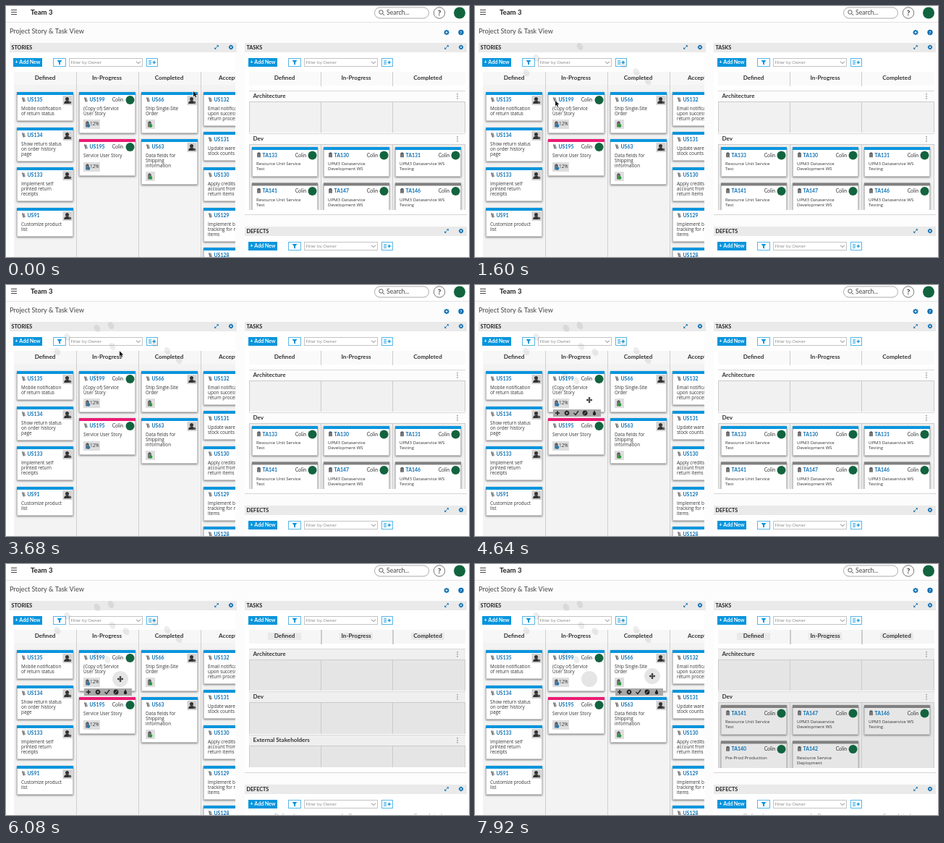
An HTML page with a canvas that plays this animation: 640 by 347 pixels, repeating every 8 s.

```html
<!DOCTYPE html>
<html lang="en">
<head>
<meta charset="utf-8">
<title>Project Story &amp; Task View</title>
<style>
html, body { margin: 0; width: 100%; height: 100%; overflow: hidden; background: #fff; }
canvas { display: block; width: 640px; height: 347px; }
</style>
</head>
<body>
<canvas id="stage"></canvas>
<script>
const W = 640, H = 347, LOOP = 8000;
const BLUE = '#0795dd', LINK = '#0b6fb3', PINK = '#ec1b74', GRAY = '#808080', INK = '#333';
const HEAD = 'Lato, sans-serif', BODY = '"Open Sans", "Noto Sans", sans-serif';
const OWNER = 'Colin';
const canvas = document.getElementById('stage');
const ctx = canvas.getContext('2d');
const ratio = window.devicePixelRatio || 1;
canvas.width = W * ratio;
canvas.height = H * ratio;

function rect(x, y, w, h, color) {
  ctx.fillStyle = color;
  ctx.fillRect(x, y, w, h);
}

function frame(x, y, w, h, color) {
  ctx.strokeStyle = color;
  ctx.lineWidth = 1;
  ctx.strokeRect(x + 0.5, y + 0.5, w - 1, h - 1);
}

function line(points, color, width = 1) {
  ctx.beginPath();
  points.forEach(([x, y]) => ctx.lineTo(x, y));
  ctx.strokeStyle = color;
  ctx.lineWidth = width;
  ctx.stroke();
}

function shape(points, color) {
  ctx.beginPath();
  points.forEach(([x, y]) => ctx.lineTo(x, y));
  ctx.closePath();
  ctx.fillStyle = color;
  ctx.fill();
}

function disc(x, y, r, color) {
  ctx.beginPath();
  ctx.arc(x, y, r, 0, Math.PI * 2);
  ctx.fillStyle = color;
  ctx.fill();
}

function ring(x, y, r, color, width = 1) {
  ctx.beginPath();
  ctx.arc(x, y, r, 0, Math.PI * 2);
  ctx.strokeStyle = color;
  ctx.lineWidth = width;
  ctx.stroke();
}

function text(str, x, y, font, color = INK, align = 'left') {
  ctx.font = font;
  ctx.fillStyle = color;
  ctx.textAlign = align;
  ctx.textBaseline = 'middle';
  ctx.fillText(str, x, y);
}

function clipped(x, y, w, h, draw) {
  ctx.save();
  ctx.beginPath();
  ctx.rect(x, y, w, h);
  ctx.clip();
  draw();
  ctx.restore();
}

const bold = size => `bold ${size}px ${HEAD}`;
const plain = size => `${size}px ${BODY}`;

function gear(x, y, r, color, hole) {
  for (let i = 0; i < 8; i++) {
    const a = i * Math.PI / 4;
    line([[x, y], [x + Math.cos(a) * r, y + Math.sin(a) * r]], color, r * 0.45);
  }
  disc(x, y, r * 0.78, color);
  disc(x, y, r * 0.36, hole);
}

function expandIcon(x, y) {
  line([[x - 2, y + 2], [x + 2, y - 2]], LINK, 0.8);
  shape([[x, y - 2.7], [x + 2.8, y - 2.7], [x + 2.8, y]], LINK);
  shape([[x, y + 2.7], [x - 2.8, y + 2.7], [x - 2.8, y]], LINK);
}

function funnel(x, y) {
  shape([[x - 3.5, y - 3], [x + 3.5, y - 3], [x + 1, y], [x + 1, y + 3.6], [x - 1, y + 2.5], [x - 1, y]], BLUE);
}

function person(x, y) {
  rect(x, y, 13, 13, '#d2d2d2');
  disc(x + 6, y + 4.5, 2.5, INK);
  shape([[x + 1.5, y + 11], [x + 2.5, y + 8], [x + 5, y + 7], [x + 8, y + 7], [x + 10.5, y + 9], [x + 10.5, y + 11]], INK);
  disc(x + 10, y + 9.5, 1.8, '#555');
}

function avatar(x, y, r) {
  disc(x, y, r, '#12643f');
}

function pageHeader() {
  rect(0, 0, W, 22, '#fff');
  rect(0, 22, W, 1, '#e3e3e3');
  [5, 8, 11].forEach(y => rect(7, y, 8, 1, '#444'));
  text('Team 3', 34, 9.5, bold(9.6), '#222');
  ctx.beginPath();
  ctx.roundRect(509.5, 2, 75, 15, 7.5);
  ctx.strokeStyle = '#aaa';
  ctx.lineWidth = 1;
  ctx.stroke();
  ring(518.5, 8.5, 2.7, '#555');
  line([[520.5, 10.5], [523, 13]], '#555');
  text('Search...', 526, 9.7, `8.6px ${HEAD}`, '#444');
  ring(599, 9.5, 7.7, '#777');
  text('?', 599, 10, bold(10), '#333', 'center');
  avatar(627, 9.5, 8);
  text('Project Story & Task View', 5, 35.5, `9.1px ${HEAD}`, '#444');
  gear(609, 36.5, 3.6, LINK, '#fff');
  disc(629, 36.5, 3.7, LINK);
  text('?', 629, 36.8, bold(6), '#fff', 'center');
}

function panelTop(x, y, width, title) {
  rect(x, y, width, 13, '#eaeaea');
  text(title, x + 2.5, y + 6.5, bold(7.2), '#222');
  const right = x + width;
  expandIcon(right - 28, y + 6);
  gear(right - 8, y + 6, 3.2, LINK, '#eaeaea');
}

function toolRow(x, y, busy) {
  rect(x, y, 40, 12, busy ? '#b3b3b3' : BLUE);
  text('+ Add New', x + 20, y + 6.2, bold(7), '#fff', 'center');
  rect(x + 55, y, 18, 12, '#fff');
  frame(x + 55, y, 18, 12, '#58b7e8');
  funnel(x + 64, y + 6);
  rect(x + 77, y, 102, 12, '#fff');
  frame(x + 77, y, 102, 12, '#c4c4c4');
  text('Filter by Owner', x + 79.5, y + 6.2, plain(6), '#888');
  line([[x + 170, y + 4.8], [x + 173, y + 7.5], [x + 176, y + 4.8]], '#777', 0.9);
  rect(x + 184, y, 16, 12, '#fff');
  frame(x + 184, y, 16, 12, '#58b7e8');
  [3.8, 6, 8.2].forEach(dy => line([[x + 187, y + dy], [x + 191, y + dy]], BLUE, 0.9));
  line([[x + 192.5, y + 6], [x + 197, y + 6]], BLUE, 1.2);
  line([[x + 194.7, y + 3.8], [x + 194.7, y + 8.2]], BLUE, 1.2);
}

function cardBox(x, y, w, h, bar, fill = '#fff') {
  ctx.save();
  ctx.shadowColor = 'rgba(0,0,0,.5)';
  ctx.shadowBlur = 2.5 * ratio;
  ctx.shadowOffsetY = ratio;
  rect(x, y, w, h, fill);
  ctx.restore();
  frame(x, y, w, h, '#c8c8c8');
  rect(x, y, w, 4, bar);
}

function storyIcon(x, y) {
  shape([[x, y - 3], [x + 3.5, y - 3], [x + 5, y + 2.5], [x + 2, y + 3]], '#999');
  line([[x + 0.5, y - 3], [x + 2.2, y + 3]], '#555', 0.8);
}

function taskIcon(x, y) {
  rect(x, y - 2.8, 5, 6, '#777');
  rect(x + 1.3, y - 3.5, 2.4, 1.5, '#444');
}

function badge(x, y, label) {
  const w = label ? 23 : 13;
  rect(x, y, w, 13, '#dedede');
  rect(x + 3, y + 3.5, 5, 7, label ? '#707880' : '#777');
  rect(x + 4.3, y + 2.5, 2.4, 2, '#444');
  disc(x + 7, y + 8.5, 2.3, label ? '#2879ad' : '#269a34');
  if (label) text(label, x + 9, y + 6.8, plain(6.4));
}

function storyCard({ x, y, h, id, lines, owned, bar = BLUE, tag }) {
  cardBox(x, y, 78, h, bar);
  storyIcon(x + 7, y + 10.5);
  text(id, x + 14.5, y + 11, bold(6.9), LINK);
  lines.forEach((s, i) => text(s, x + 6, y + 23.3 + i * 6.8, plain(6.35)));
  if (owned) {
    text(OWNER, x + 61, y + 11, `6.8px ${HEAD}`, INK, 'right');
    avatar(x + 70.5, y + 11, 6);
  } else {
    person(x + 63.5, y + 5);
  }
  if (tag !== undefined) badge(x + 6, y + 38 - (lines.length === 1 ? 6 : 0) + (lines.length === 3 ? 7 : 0), tag);
}

const stories = [
  { x: 15, y: 119, h: 40, id: 'US135', lines: ['Mobile notification', 'of return status'] },
  { x: 15, y: 168, h: 47, id: 'US134', lines: ['Show return status', 'on order history', 'page'] },
  { x: 15, y: 223, h: 47, id: 'US133', lines: ['Implement self', 'printed return', 'receipts'] },
  { x: 15, y: 279, h: 40, id: 'US91', lines: ['Customize product', 'list'] },
  { x: 101, y: 119, h: 57, id: 'US199', lines: ['(Copy of) Service', 'User Story'], owned: true, tag: '12%' },
  { x: 101, y: 184, h: 51, id: 'US195', lines: ['Service User Story'], owned: true, bar: PINK, tag: '12%' },
  { x: 187, y: 119, h: 57, id: 'US66', lines: ['Ship Single-Site', 'Order'], tag: '' },
  { x: 187, y: 184, h: 63, id: 'US63', lines: ['Data fields for', 'Shipping', 'information'], tag: '' },
  { x: 273, y: 119, h: 47, id: 'US132', lines: ['Email notification', 'upon successful', 'return processing'] },
  { x: 273, y: 174, h: 40, id: 'US131', lines: ['Update warehouse', 'stock counts'] },
  { x: 273, y: 223, h: 47, id: 'US130', lines: ['Apply credits to', 'account from valid', 'return items'] },
  { x: 273, y: 279, h: 47, id: 'US129', lines: ['Implement barcode', 'tracking for return', 'items'] },
  { x: 273, y: 334, h: 40, id: 'US128', lines: [] }
];

function storiesPanel() {
  panelTop(5, 51, 314, 'STORIES');
  rect(5, 64, 312, 283, '#fff');
  toolRow(10, 72, false);
  clipped(5, 90, 312, 257, () => {
    rect(11, 91, 306, 18, '#f7f7f7');
    rect(11, 109, 306, 238, '#f3f3f3');
    [97, 183, 269].forEach(x => rect(x, 91, 1, 256, '#cfcfcf'));
    const names = ['Defined', 'In-Progress', 'Completed', 'Accepted'];
    names.forEach((s, i) => text(s, [54, 139.5, 225.5, 311][i], 100, bold(8.1), INK, 'center'));
    stories.forEach(storyCard);
  });
}

const UNIT = ['Resource Unit Service', 'Test'];
const DEVELOP = ['UPM3 Dataservice', 'Development WS'];
const TESTING = ['UPM3 Dataservice WS', 'Testing'];
const allTasks = [
  ['TA133', UNIT, BLUE], ['TA130', DEVELOP, BLUE], ['TA131', TESTING, BLUE],
  ['TA141', UNIT, GRAY], ['TA147', DEVELOP, GRAY], ['TA146', TESTING, GRAY]
];
const storyTasks = [
  ...allTasks.slice(3),
  ['TA140', ['Pre-Prod Production'], GRAY], ['TA142', ['Resource Service', 'Deployment'], GRAY]
];

function taskCards(tasks, fill) {
  clipped(336, 191, 299, 91, () => tasks.forEach(([id, lines, bar], i) => {
    const x = 340 + (i % 3) * 99, y = 195 + Math.floor(i / 3) * 49.5;
    cardBox(x, y, 91, 41, bar, fill);
    taskIcon(x + 7, y + 11);
    text(id, x + 14.5, y + 11.5, bold(6.9), LINK);
    text(OWNER, x + 75, y + 11.5, `6.8px ${HEAD}`, INK, 'right');
    avatar(x + 83.5, y + 11.5, 6);
    lines.forEach((s, k) => text(s, x + 6, y + 23.8 + k * 6.8, plain(6.1)));
  }));
}

function columnNames(y, color, patch) {
  ['Defined', 'In-Progress', 'Completed'].forEach((s, i) => {
    const x = 385 + i * 99;
    if (patch) rect(x - 23, y - 5, 46, 10, patch);
    text(s, x, y, bold(8.1), color, 'center');
  });
}

function lane(name, y, bottom, bg, fill) {
  rect(336, y, 299, 15, bg);
  rect(336, y, 299, 1, '#d8d8d8');
  text(name, 341.5, y + 7.5, bold(8.1), INK);
  [4, 7, 10].forEach(dy => rect(623, y + dy, 2, 1.5, '#aaa'));
  rect(336, y + 15, 299, bottom - y - 15, fill);
  [336, 435, 534, 634].forEach(x => rect(x, y + 15, 1, bottom - y - 15, '#cbcbcb'));
  rect(336, y + 15, 299, 1, '#cbcbcb');
}

function loadingTasks() {
  columnNames(100, '#dedede', '#f1f1f1');
  [435, 534].forEach(x => rect(x, 91, 3, 20, '#ececec'));
  rect(336, 117, 299, 14, '#f0f0f0');
  rect(336, 131, 299, 156, '#e9e9e9');
  rect(336, 177, 299, 13, '#efefef');
  text('Architecture', 341.5, 124.5, bold(8.1), '#d8d8d8');
  text('Dev', 341.5, 184.5, bold(8.1), '#d4d4d4');
  clipped(336, 191, 299, 91, () => allTasks.forEach(([id, lines], i) => {
    const x = 340 + (i % 3) * 99, y = 195 + Math.floor(i / 3) * 49.5;
    frame(x, y, 91, 41, '#f6f6f6');
    text(id, x + 14.5, y + 11.5, bold(6.9), '#d4d4d4');
    text(OWNER, x + 75, y + 11.5, `6.8px ${HEAD}`, '#d4d4d4', 'right');
    disc(x + 83.5, y + 11.5, 6, '#dedede');
    lines.forEach((s, k) => text(s, x + 6, y + 23.8 + k * 6.8, plain(6.1), '#d0d0d0'));
  }));
  rect(623, 121, 2, 7, '#d0d0d0');
  rect(623, 181, 2, 7, '#d0d0d0');
}

function tasksPanel(state) {
  const busy = state === 'loading';
  panelTop(330, 51, 307, 'TASKS');
  rect(330, 64, 307, 225, '#fff');
  rect(330, 288, 307, 1, '#d6d6d6');
  toolRow(335, 72, busy);
  if (busy) {
    loadingTasks();
  } else {
    const fresh = state === 'all';
    const laneBg = fresh ? '#fcfcfc' : '#efefef';
    const cell = fresh ? '#f1f1f1' : '#e5e5e5';
    rect(336, 91, 299, 19, fresh ? '#fafafa' : '#f6f6f6');
    columnNames(100, INK, fresh ? '' : '#e9e9e9');
    [435, 534].forEach(x => rect(x, 91, fresh ? 1 : 2, 20, '#cbcbcb'));
    lane('Architecture', 117, 175, laneBg, cell);
    if (state === 'empty') {
      lane('Dev', 176, 235, laneBg, cell);
      lane('External Stakeholders', 236, 281, laneBg, cell);
    } else {
      lane('Dev', 176, 282, laneBg, cell);
      taskCards(fresh ? allTasks : storyTasks, fresh ? '#fff' : '#e6e6e6');
    }
  }
  panelTop(330, 305, 307, 'DEFECTS');
  rect(330, 318, 307, 29, '#fff');
  toolRow(335, 326, busy);
  if (!fresh0(state)) columnNames(349, '#c8c8c8', '');
}

const fresh0 = state => state === 'all';

function actionBar(x) {
  const y = 177, dark = '#222';
  rect(x, 172, 66, 10, '#a8a8a8');
  line([[x + 3, y], [x + 9, y]], dark, 1.5);
  line([[x + 6, y - 3], [x + 6, y + 3]], dark, 1.5);
  gear(x + 19, y, 3.5, dark, '#a8a8a8');
  line([[x + 28.5, y], [x + 31, y + 2.5], [x + 35, y - 3]], dark, 1.3);
  disc(x + 44, y, 3.4, dark);
  line([[x + 42, y + 2], [x + 46, y - 2]], '#a8a8a8', 0.9);
  disc(x + 57, y + 1, 2.2, dark);
  shape([[x + 57, y - 4], [x + 59, y + 0.5], [x + 55, y + 0.5]], dark);
}

// Pointer path: time, x, y.
const path = [
  [0, 259, 118], [80, 259, 118], [400, 224, 88], [800, 143, 53], [1050, 84, 69], [1260, 72, 88],
  [1560, 111, 131], [1840, 111, 131], [2400, 141, 129], [2720, 141, 129], [3040, 126, 110],
  [3360, 146, 84], [3920, 164, 96], [4320, 158, 159], [6480, 158, 159], [6640, 162, 159],
  [7280, 255, 157], [7440, 255, 157], [7680, 245, 155], [LOOP, 245, 155]
];

function pointerAt(t) {
  const i = path.findIndex((p, k) => k && t <= p[0]);
  const [t0, x0, y0] = path[i - 1], [t1, x1, y1] = path[i];
  const f = (t - t0) / (t1 - t0), s = f * f * (3 - 2 * f);
  return [x0 + (x1 - x0) * s, y0 + (y1 - y0) * s];
}

function arrow(x, y) {
  const tip = [[0, 0], [0, 7.2], [1.7, 5.7], [3, 8.5], [4.2, 8], [3, 5.2], [5.3, 5.1]].map(([a, b]) => [x + a, y + b]);
  line([...tip, tip[0]], '#fff', 1);
  shape(tip, '#111');
}

function moveCursor(x, y) {
  line([[x - 3, y], [x + 3, y]], '#111', 1.2);
  line([[x, y - 3], [x, y + 3]], '#111', 1.2);
  [[1, 0], [-1, 0], [0, 1], [0, -1]].forEach(([a, b]) => {
    const cx = x + a * 2.3, cy = y + b * 2.3;
    shape([[x + a * 4.3, y + b * 4.3], [cx + b * 1.8, cy + a * 1.8], [cx - b * 1.8, cy - a * 1.8]], '#111');
  });
}

// Faint marks left along the pointer's way: time, x, y.
const trail = [
  [200, 239, 104], [400, 223, 91], [500, 205, 81], [800, 145, 56], [1050, 85, 72], [1260, 71, 92],
  [3000, 126, 60], [3100, 125, 126], [3360, 147, 85], [3900, 166, 93], [4100, 140, 132]
];

function drawTrail(t) {
  ctx.globalAlpha = 0.07;
  trail.forEach(([start, x, y]) => {
    if (t < start) return;
    ctx.beginPath();
    ctx.ellipse(x, y, 4, 5.5, -0.5, 0, Math.PI * 2);
    ctx.fillStyle = '#000';
    ctx.fill();
  });
  ctx.globalAlpha = 1;
}

function halo(x, y) {
  ctx.globalAlpha = 0.1;
  disc(x, y, 11, '#000');
  ctx.globalAlpha = 1;
}

function taskState(t) {
  if (t < 5520) return 'all';
  if (t < 5920) return 'loading';
  return t < 6320 ? 'empty' : 'story';
}

function render(t) {
  ctx.setTransform(ratio, 0, 0, ratio, 0, 0);
  rect(0, 0, W, H, '#fcfcfc');
  pageHeader();
  storiesPanel();
  tasksPanel(taskState(t));
  drawTrail(t);
  const [x, y] = pointerAt(t);
  if (t >= 5520) halo(158, 159);
  if (t >= 7680) halo(245, 155);
  if (t >= 4160) {
    if (x < 180) actionBar(108);
    else if (x > 187) actionBar(194);
    moveCursor(x, y);
  } else {
    arrow(x, y);
  }
}

function tick() {
  render(performance.now() % LOOP);
  requestAnimationFrame(tick);
}
tick();
</script>
</body>
</html>
```
